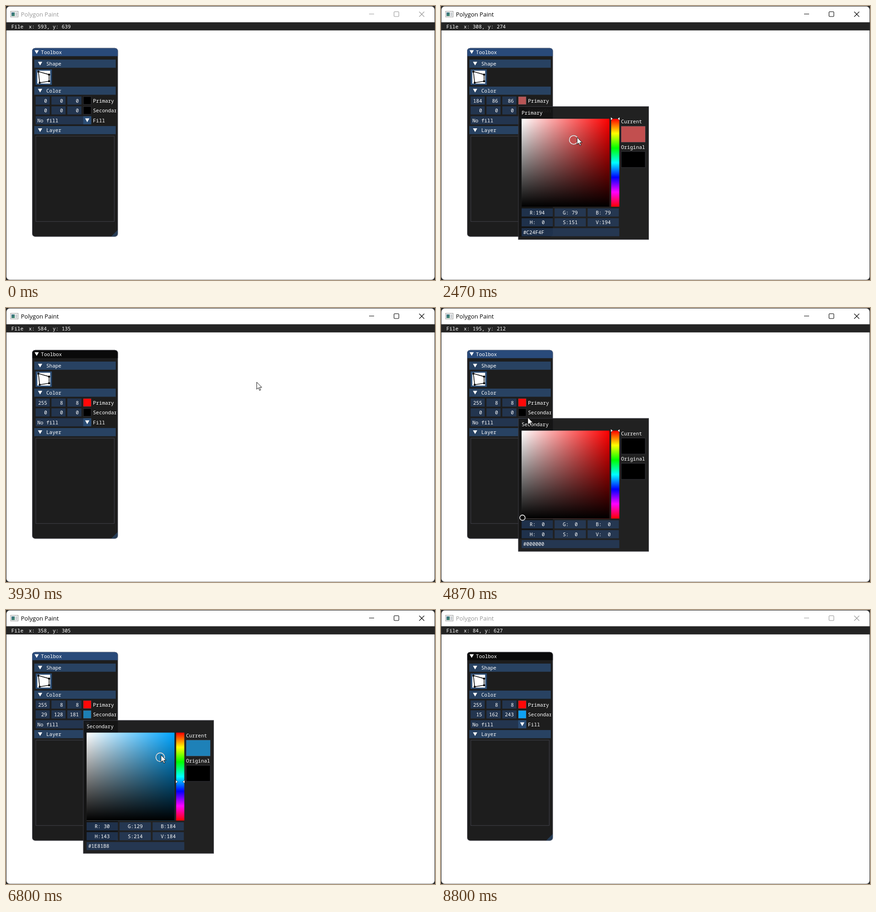
Animation of 937x598 px, one loop 8.94 s. Source, as an HTML page:

```html
<!DOCTYPE html>
<html lang="en">
<head>
<meta charset="utf-8">
<title>Polygon Paint</title>
<style>
  html, body { margin: 0; width: 100%; height: 100%; overflow: hidden; background: #2b2b2b; }
  svg { display: block; width: 937px; height: 598px; }
  text { font: 11.667px "Noto Sans Mono", "DejaVu Sans Mono", monospace; fill: #fff; white-space: pre; }
  .caption { font: 13px "Open Sans", "Noto Sans", sans-serif; fill: currentColor; }
  .field { fill: rgba(41, 74, 122, .54); }
  .header { fill: rgba(66, 150, 250, .31); }
  .button { fill: rgba(66, 150, 250, .4); }
  .edge { fill: none; stroke: rgba(110, 110, 128, .5); }
  .swatch { stroke: rgba(110, 110, 128, .35); }
  .arrow { fill: #fff; }
  .controls { fill: none; stroke: currentColor; stroke-width: 1.1; }
</style>
</head>
<body>
<svg viewBox="0 0 937 598">
  <defs>
    <linearGradient id="tint"><stop stop-color="#fff"/><stop id="hueStop" offset="1"/></linearGradient>
    <linearGradient id="shade" x2="0" y2="1"><stop stop-opacity="0"/><stop offset="1"/></linearGradient>
    <linearGradient id="rainbow" x2="0" y2="1"></linearGradient>
    <linearGradient id="iconFill" x2="1" y2="1"><stop stop-color="#3f6f8f"/><stop offset="1" stop-color="#3d8a62"/></linearGradient>
    <clipPath id="toolClip"><rect x="60" y="79" width="196" height="421"/></clipPath>
  </defs>

  <rect x="1" y="1" width="935" height="596.5" rx="7" fill="#fff"/>
  <rect x="10" y="11.5" width="16.5" height="12.5" fill="#f4f4f4" stroke="#9a9a9a"/>
  <rect x="12" y="14" width="7" height="8" fill="url(#iconFill)"/>
  <rect x="20.5" y="14" width="4" height="8" fill="#c9ced2"/>
  <g id="chrome">
    <text class="caption" x="32.5" y="23">Polygon Paint</text>
    <g class="controls">
      <path d="M793 17.5H804M902.5 12.5L913.5 23.5M913.5 12.5L902.5 23.5"/>
      <rect x="847.5" y="12.5" width="10.5" height="10.5" rx="1.5"/>
    </g>
  </g>

  <!-- Client area, in the application's own pixels -->
  <g transform="translate(1 35.5) scale(.936)">
    <rect width="999" height="19" fill="#242424"/>
    <text x="11.5" y="14">File</text>
    <text id="coords" x="52" y="14"></text>
    <g id="toolbox"></g>
    <g id="popup"></g>
    <path id="cursor" d="M0 0V16.5L3.9 13 6.6 19.2 9.2 18.2 6.5 12.1H11.8Z" fill="#fff" stroke="#000"/>
  </g>
</svg>

<script>
const LOOP = 8940, STEP = 200 / 3, INPUT_LAG = 40;
const FRAME = 19, SV = 205, PICK_X = 187, PICK_Y = 225;
const $ = id => document.getElementById(id);
const clamp = (v, lo = 0, hi = 1) => Math.min(hi, Math.max(lo, v));
const mix = (a, b, k) => a + (b - a) * k;
const pad = n => String(n).padStart(3);
const smooth = k => k * k * (3 - 2 * k);
const easeOut = k => 1 - (1 - k) ** 3;

const PRIMARY = { name: "Primary", top: PICK_Y, press: 2235, release: 3000, open: 1866, close: 3466 };
const SECONDARY = { name: "Secondary", top: PICK_Y + FRAME + 4, press: 6540, release: 7200, open: 4800, close: 7466 };
const HUE_PRESS = 5950, HUE_RELEASE = 6150, FOCUS_CLICK = 4730;

const ENTRY = { x: 593, y: 639 };
const move = (start, end, x, y, ease = smooth) => ({ start, end, x, y, ease });
const MOVES = [
  move(0, 1350, 196, 179, easeOut),   // primary swatch
  move(2070, 2235, 286, 289),
  move(2235, 2862, 385, 222),         // drag to red
  move(3010, 3400, 638, 190),
  move(3480, 3900, 584, 135),
  move(3990, 4490, 189, 207),         // secondary swatch
  move(4730, 5660, 404, 384),
  move(5690, 5890, 400, 368),
  move(5960, 6080, 400, 362),         // drag the hue
  move(6290, 6690, 358, 307),
  move(6716, 7080, 378, 258),         // drag to blue
  move(7230, 7700, 507, 222),
  move(8200, 8740, 84, 627)
];

function pointer(t) {
  return MOVES.reduce((p, m) => {
    const k = m.ease(clamp((t - m.start) / (m.end - m.start)));
    return { x: mix(p.x, m.x, k), y: mix(p.y, m.y, k) };
  }, ENTRY);
}
function mouse(t) {
  const p = pointer(t);
  return { x: Math.floor(p.x), y: Math.floor(p.y) };
}

function rgb(h, s, v) {
  const channel = n => {
    const k = (n + h * 6) % 6;
    return Math.round(255 * v * (1 - s * clamp(Math.min(k, 4 - k))));
  };
  return [channel(5), channel(3), channel(1)];
}
const css = c => `rgb(${c})`;

function colorAt(picker, t) {
  let h = 0, s = 0, v = 0;
  const slide = n => clamp(n / (SV - 1));
  if (picker === SECONDARY && t >= HUE_PRESS)
    h = slide(mouse(Math.min(t, HUE_RELEASE)).y - picker.top);
  if (t >= picker.press) {
    const p = mouse(Math.min(t, picker.release));
    s = slide(p.x - PICK_X);
    v = 1 - slide(p.y - picker.top);
  }
  return { h, s, v, rgb: rgb(h, s, v) };
}

const rect = (cls, x, y, w, h, more = "") =>
  `<rect class="${cls}" x="${x}" y="${y}" width="${w}" height="${h}" ${more}/>`;
const edge = (x, y, w, h, more) => rect("edge", x + .5, y + .5, w - 1, h - 1, more);
const swatch = (x, y, w, h, id = "") => rect("swatch", x + .5, y + .5, w - 1, h - 1, `id="${id}"`);
const label = (x, y, s, id = "") => `<text x="${x}" y="${y + 11}" id="${id}">${s}</text>`;
const down = (x, y) => `<path class="arrow" d="M${x - 5} ${y - 4.3}h10l-5 8.6z"/>`;
const header = (y, s) => rect("header", 65, y, 190, FRAME) + down(78.5, y + 9.5) + label(93, y + 3, s);

function colorRow(id, y, name) {
  const fields = [0, 1, 2].map(i => {
    const x = 68 + 37 * i;
    return rect("field", x, y, 33, FRAME) + label(x + 6, y + 3, "", id + i);
  }).join("");
  return fields + swatch(179, y, FRAME, FRAME, id + "Swatch") + label(202, y + 3, name);
}

$("toolbox").innerHTML = `
  <rect x="60" y="60" width="200" height="440" rx="7" fill="rgba(15,15,15,.94)"/>
  <path id="titleBar" d="M60 79V67a7 7 0 0 1 7-7h186a7 7 0 0 1 7 7V79z"/>
  <path d="M260 484V493a7 7 0 0 1-7 7H244z" fill="rgba(66,150,250,.25)"/>
  ${edge(60, 60, 200, 440, 'rx="7"')}
  ${down(70.5, 69.5)}${label(80.5, 63, "Toolbox")}
  <g clip-path="url(#toolClip)">
    ${header(87, "Shape")}${header(150, "Color")}${header(242, "Layer")}
    ${rect("button", 68, 110, 38, 36)}
    <rect x="72" y="113" width="30" height="30" fill="#fff"/>
    <g fill="none" stroke="#000" stroke-linecap="round">
      <path d="M74.5 115L99.5 122V137.5L77.5 141Z" stroke-width="1.6"/>
      <path d="M74.5 115h0M99.5 122h0M99.5 137.5h0M77.5 141h0" stroke-width="4.8"/>
    </g>
    ${colorRow("primary", 173, "Primary")}${colorRow("secondary", 196, "Secondary")}
    ${rect("field", 68, 219, 111, FRAME)}${rect("button", 179, 219, FRAME, FRAME)}
    ${down(188.5, 228.5)}${label(72, 222, "No fill")}${label(202, 222, "Fill")}
    ${edge(68, 265, 184, 200)}
  </g>`;

const CELLS = ["R", "G", "B", "H", "S", "V"];
$("popup").innerHTML = `
  <rect x="179" y="196" width="305" height="311" fill="rgba(20,20,20,.94)"/>
  ${edge(179, 196, 305, 311)}
  ${label(PICK_X, 204, "", "popupName")}
  ${rect("", PICK_X, PICK_Y, SV, SV, 'fill="url(#tint)"')}
  ${rect("", PICK_X, PICK_Y, SV, SV, 'fill="url(#shade)"')}
  ${rect("", 396, PICK_Y, FRAME, SV, 'fill="url(#rainbow)"')}
  <path id="hueMark" d="M395-4L400 0 395 4ZM416-4L411 0 416 4Z" fill="#fff" stroke="#000" stroke-width=".7"/>
  ${label(419, 225, "Current")}${swatch(419, 242, 57, 38, "current")}
  ${label(419, 284, "Original")}${swatch(419, 301, 57, 38)}
  ${CELLS.map((c, i) => {
    const x = PICK_X + 77 * (i % 3), y = i < 3 ? 434 : 457;
    return rect("field", x, y, 73, FRAME) + label(x + 19, y + 3, "", "cell" + c);
  }).join("")}
  ${rect("field", PICK_X, 480, 228, FRAME)}${label(191, 483, "", "hex")}
  <g id="ring"><circle id="ringOuter" fill="none" stroke="#808080"/>
  <circle id="ringInner" stroke="#fff" stroke-width="1.4"/></g>`;

$("rainbow").innerHTML = Array.from({ length: 7 }, (_, i) =>
  `<stop offset="${i / 6}" stop-color="${css(rgb(i / 6, 1, 1))}"/>`).join("");

const place = (id, x, y) => $(id).setAttribute("transform", `translate(${x} ${y})`);

function drawRow(id, color) {
  color.rgb.forEach((n, i) => $(id + i).textContent = pad(n));
  $(id + "Swatch").setAttribute("fill", css(color.rgb));
}

function drawPopup(picker, t) {
  const c = colorAt(picker, t);
  const values = [...c.rgb, ...[c.h, c.s, c.v].map(n => Math.round(n * 255))];
  CELLS.forEach((name, i) => $("cell" + name).textContent = `${name}:${pad(values[i])}`);
  $("popupName").textContent = picker.name;
  $("hex").textContent = "#" + c.rgb.map(n => n.toString(16).padStart(2, "0")).join("").toUpperCase();
  $("hueStop").setAttribute("stop-color", css(rgb(c.h, 1, 1)));
  $("current").setAttribute("fill", css(c.rgb));
  place("popup", 0, picker.top - PICK_Y);
  place("hueMark", 0, PICK_Y + c.h * SV);

  const radius = t >= picker.press && t < picker.release ? 10 : 6;
  const inside = n => clamp(n * SV, 2, SV - 2);
  place("ring", PICK_X + inside(c.s), PICK_Y + inside(1 - c.v));
  $("ringOuter").setAttribute("r", radius + 1);
  $("ringInner").setAttribute("r", radius);
  $("ringInner").setAttribute("fill", css(c.rgb));
}

function draw(now) {
  const t = Math.floor((now % LOOP + 4) / STEP) * STEP;
  const input = t - INPUT_LAG;
  const tip = pointer(t), seen = mouse(input);
  const open = [PRIMARY, SECONDARY].find(p => t >= p.open && t < p.close);
  const active = t >= 1599 && t < 8730;
  const focused = t < PRIMARY.close || (t >= FOCUS_CLICK && t < SECONDARY.close);

  $("chrome").style.color = active ? "#000" : "#979797";
  $("titleBar").setAttribute("fill", focused ? "#294a7a" : "#0a0a0a");
  $("coords").textContent = `x: ${seen.x}, y: ${seen.y}`;
  drawRow("primary", colorAt(PRIMARY, input - STEP));
  drawRow("secondary", colorAt(SECONDARY, input - STEP));
  $("popup").style.display = open ? "" : "none";
  if (open) drawPopup(open, input);
  place("cursor", tip.x, tip.y);
}

function tick() {
  draw(performance.now());
  requestAnimationFrame(tick);
}
tick();
</script>
</body>
</html>
```
